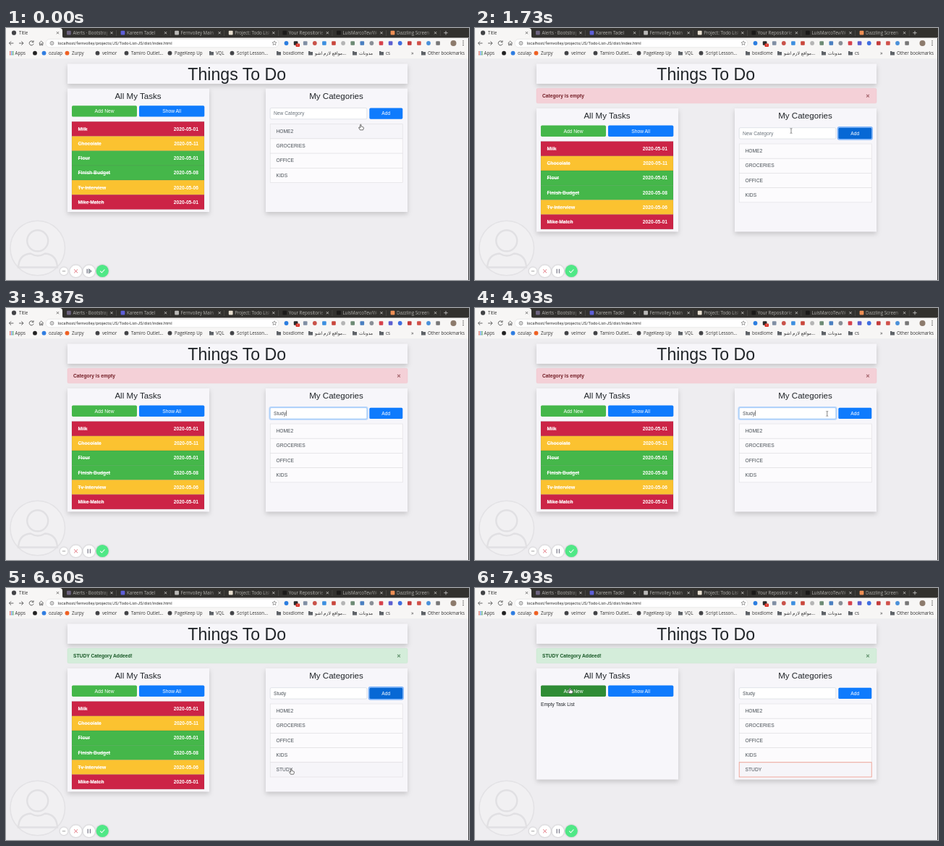
Animation of 640x348 px, one loop 8 s. Source, as an HTML page:

```html
<!DOCTYPE html>
<html lang="en">
<head>
<meta charset="utf-8">
<title>Things To Do</title>
<style>
html, body { margin: 0; width: 100%; height: 100%; overflow: hidden; background: #eeedf0; }
svg { display: block; width: 100vw; height: 100vh; font-family: "Liberation Sans", Arial, sans-serif; }
.ui { font-family: "Open Sans", "Noto Sans", sans-serif; }
.card { filter: drop-shadow(0 3px 3.4px rgba(0,0,0,.17)); }
.soft { filter: drop-shadow(0 .8px 1.2px rgba(0,0,0,.25)); }
</style>
</head>
<body>
<svg viewBox="0 0 640 348">
  <defs>
    <linearGradient id="fade">
      <stop offset="0" stop-color="#32312e" stop-opacity="0"/>
      <stop offset="1" stop-color="#32312e"/>
    </linearGradient>
  </defs>
  <g id="chrome" class="ui"></g>
  <g id="page"></g>
  <g id="recorder"></g>
  <g id="mouse"></g>
</svg>
<script>
const $ = id => document.getElementById(id);
const rect = (x, y, w, h, fill, more = '') =>
  `<rect x="${x}" y="${y}" width="${w}" height="${h}" fill="${fill}" ${more}/>`;
const dot = (x, y, r, fill, more = '') => `<circle cx="${x}" cy="${y}" r="${r}" fill="${fill}" ${more}/>`;
const line = (d, color, w = 1) => `<path d="${d}" fill="none" stroke="${color}" stroke-width="${w}"/>`;
const text = (x, y, size, str, fill, more = '') =>
  `<text x="${x}" y="${y}" font-size="${size}" fill="${fill}" ${more}>${str}</text>`;
const cross = (x, y, r, color, w) =>
  line(`M${x - r} ${y - r}l${2 * r} ${2 * r}m0 ${-2 * r}l${-2 * r} ${2 * r}`, color, w);
const MID = 'text-anchor="middle"', END = 'text-anchor="end"', BOLD = 'font-weight="bold"';
const BLUE = '#0f7bfd', BLUE_DARK = '#0768d5', GREEN = '#45b74a', GREEN_DARK = '#2f8c35';
const RED = '#cc2446', YELLOW = '#fbc230', GLOBE = '#434447';

// Browser window
const tabs = [
  ['Alerts · Bootstrap', '#6d6480'], ['Kareem Tadel', '#5d5fd8'], ['Fernvolley Main', '#b9b8b6'],
  ['Project: Todo List', '#e8dfd0'], ['Your Repositories', '#1b1a19'], ['LuisMarcoTev/We', '#1b1a19'],
  ['Dazzling Screen', '#ee8f55']
];
const bookmarks = [
  [46.5, '', '#222'], [59, 'ozulap', '#2f7de1'], [91, 'Zurpy', '#ee6123'], [133, 'velmor', GLOBE],
  [173, 'Tamiro Outlet...', GLOBE], [233, 'PageKeep Up', GLOBE], [290, 'VQL'],
  [319, 'Script Lesson...', GLOBE], [383, 'boxdlome'], [427, 'مواقع لازم اشو...'],
  [488, 'مدونات'], [525, 'cs'], [583, 'Other bookmarks']
];
const extensions = ['#2b7de0', '#2a2a2a', '#7f8ea3', '#c9534a', '#3c8fe0', '#c9473c', '#b5b5b5', '#6d8a74',
  '#4a7fc0', '#8a8f96', '#d6404a', '#5b5ecf', '#3f6fe0', '#c33b3b', '#d0504a', '#4a90d9', '#777'];

function drawChrome() {
  let s = rect(0, 0, 640, 14, '#32312e') + rect(0, 13.5, 640, 29, '#f7f6f5');
  s += '<path d="M0 14V0H74Q78 0 78 4V11Q78 14 81 14Z" fill="#f7f6f5"/>';
  s += dot(11, 6.7, 3.1, GLOBE) + text(18, 9, 6.2, 'Title', '#333') + cross(71.5, 6.7, 1.6, '#555', .8);
  tabs.forEach(([name, color], i) => {
    const x = 78 + i * 74.6;
    s += rect(x + 6, 3.8, 5.8, 5.8, color, 'rx="1"') + text(x + 14.4, 9, 6.2, name, '#b3b2af') +
      rect(x + 54, 1, 13, 12, 'url(#fade)') + rect(x + 62, 1, 12, 12, '#32312e') +
      cross(x + 68, 6.7, 1.6, '#d5d4d1', .8) + rect(x + 74.3, 3, .5, 8, '#5b5a57');
  });
  s += line('M608 4v5.4m-2.7-2.7h5.4', '#ccc', .8);
  // toolbar
  s += line('M10.4 21h-6m2.6-2.6L4.4 21l2.6 2.6', '#555', .9) +
    line('M18 21h6m-2.6-2.6l2.6 2.6l-2.6 2.6', '#555', .9) +
    line('M37.6 19.1a3 3 0 1 0 .5 2.6M38 17.3v2.3h-2.3', '#555', .9) +
    line('M45.6 21l3.1-2.9 3.1 2.9m-5.2-.6v3.4h1.4v-2h1.4v2h1.4v-3.4', '#555', .8);
  s += rect(55, 15.3, 322, 11.5, '#fff', 'rx="5.7" stroke="#ddd" stroke-width=".6"');
  s += dot(63.5, 21, 2.4, 'none', 'stroke="#555" stroke-width=".7"') + line('M63.5 20.6v1.7m0-2.9v.7', '#555', .7);
  s += text(71.6, 23.2, 5.75, 'localhost/fernvolley/projects/JS/Todo-List-JS/dist/index.html', '#333',
    'style="font-family:Roboto,sans-serif"');
  s += '<path d="M371 17.8l.9 2 2.1.2-1.6 1.4.5 2.1-1.9-1.1-1.9 1.1.5-2.1-1.6-1.4 2.1-.2z" fill="none" stroke="#666" stroke-width=".6"/>';
  extensions.forEach((c, i) => {
    const x = 387.5 + i * 13.1;
    s += i % 3 ? rect(x - 2.8, 18.2, 5.6, 5.6, c, 'rx="1"') : dot(x, 21, 2.9, c);
  });
  s += rect(400.5, 21.5, 5.5, 4.5, '#d93025', 'rx="1"') + text(403.2, 25.3, 4, '1', '#fff', MID);
  s += dot(618.5, 21, 4, '#8c7a6c') + [18, 20.8, 23.6].map(y => dot(632, y, .8, '#555')).join('');
  // bookmarks
  for (let i = 0; i < 9; i++)
    s += rect(5 + i % 3 * 2, 32 + (i / 3 | 0) * 2, 1.4, 1.4, ['#e35142', '#4a8af4', '#3ba55a'][i % 3]);
  s += text(12.5, 37, 6.2, 'Apps', '#333');
  for (const [x, name, color] of bookmarks) {
    s += color ? dot(x - 6.5, 34.7, 2.9, color)
      : `<path d="M${x - 9} 32h2l.8 1h3.2v4.4h-6z" fill="#5f6368"/>`;
    s += text(x, 37, 6.2, name, '#333');
  }
  s += text(560, 37, 7, '»', '#444');
  $('chrome').innerHTML = s;
}

// Page
const tasks = [
  ['Milk', '01', RED], ['Chocolate', '11', YELLOW], ['Flour', '01', GREEN],
  ['Finish Budget', '08', GREEN], ['Tv Interview', '06', YELLOW], ['Mike Match', '01', RED]
];
const ROW = 20.2;
const TYPED = [2600, 3070, 3470, 3670, 3870];
const ALERT = 400, FOCUS = 2070, ADDED = 5250, PICKED = 6680;

const panel = (x, y, w, h) => rect(x, y, w, h, '#f7f6fa', 'class="card"');
const button = (x, y, w, label, fill, ring) =>
  (ring ? rect(x - .8, y - .8, w + 1.6, 17, 'none', 'rx="2.2" stroke="#7fb5fb" stroke-width="1.6"') : '') +
  rect(x, y, w, 15.4, fill, 'rx="1.7"') + text(x + w / 2, y + 10, 6.7, label, '#fff', MID);

function alertBox(added) {
  const [bg, edge, ink, msg] = added
    ? ['#d4edda', '#c3e6cb', '#155724', 'STUDY Category Addeed!']
    : ['#f4d0d7', '#f1c3cb', '#721c24', 'Category is empty'];
  return rect(85, 83.4, 470, 20.4, bg, `rx="1.7" stroke="${edge}" stroke-width=".5"`) +
    text(93, 96, 6.7, msg, ink, BOLD) + cross(543, 93.8, 1.9, ink + '99', 1.1);
}

function drawPage(t, m) {
  const dy = t < ALERT ? 0 : 27.3, added = t >= ADDED, picked = t >= PICKED;
  const h = picked ? 153.5 : 170.3, top = 83.7 + dy;
  let s = rect(0, 42.5, 640, 306, '#eeedf0') + rect(639, 14, 1, 334, '#3a3a3c');
  s += panel(85, 49.5, 470, 27.5) + text(319.2, 71.6, 23.1, 'Things To Do', '#212529', MID);
  if (dy) s += alertBox(added);

  // tasks
  s += panel(85, top, 196, h) + text(182.5, 97.8 + dy, 11.6, 'All My Tasks', '#212529', MID);
  const overNew = m.x > 91 && m.x < 181 && m.y > 134 && m.y < 152;
  s += button(91, 107.2 + dy, 90, 'Add New', overNew ? GREEN_DARK : GREEN) +
    button(184, 107.2 + dy, 90.3, 'Show All', BLUE);
  if (picked) s += text(91, 136 + dy, 6.7, 'Empty Task List', '#212529');
  else tasks.forEach(([name, day, color], i) => {
    const y = 129.3 + dy + i * ROW;
    s += rect(91, y, 183, ROW, color, 'stroke="#000" stroke-opacity=".16" stroke-width=".5"') +
      text(99.5, y + 12.4, 6.7, name, '#fff', BOLD + ' text-decoration="line-through"') +
      text(266, y + 12.4, 6.7, '2020-05-' + day, '#fff', `${BOLD} ${END}`);
  });

  // categories
  s += panel(359, top, 196, h) + text(456.5, 97.8 + dy, 11.6, 'My Categories', '#212529', MID);
  const focus = t >= FOCUS && t < ADDED;
  if (focus) s += rect(364.4, 109.7 + dy, 135.2, 16.8, 'none', 'rx="2" stroke="#bcd8fb" stroke-width="2"');
  s += rect(365.2, 110.4 + dy, 133.6, 15.4, '#fff',
    `rx="1.7" stroke="${focus ? '#80b7f5' : '#ced4da'}" stroke-width=".6"`);
  const n = TYPED.filter(k => t >= k).length;
  s += n ? text(370, 120.4 + dy, 6.7, 'Study'.slice(0, n), '#495057')
    : text(370, 120.4 + dy, 6.7, 'New Category', '#6c757d');
  const since = t - (n ? TYPED[n - 1] : FOCUS);
  if (focus && since % 1000 < 530)
    s += rect([370, 374.6, 376.5, 380.2, 383.9, 387.3][n], 114.2 + dy, .6, 7.6, '#333');
  const overAdd = m.x > 501 && m.x < 549 && (t < 930 ? m.y < 126 : t > 4000 && m.y < 154);
  const ring = (t >= 800 && t < FOCUS) || (added && !picked);
  s += button(502.3, 110.4 + dy, 46, 'Add', overAdd || ring ? BLUE_DARK : BLUE, ring);

  const list = ['HOME2', 'GROCERIES', 'OFFICE', 'KIDS'].concat(added ? 'STUDY' : []);
  list.forEach((name, i) => {
    const y = 132.7 + dy + i * ROW, active = picked && i === 4;
    const hover = m.show && m.x > 365 && m.x < 548 && m.y - 3 > y && m.y - 3 < y + ROW;
    s += rect(365.2, y, 183, ROW, hover || active ? '#f6f5f9' : '#fcfbfd',
      `stroke="${active ? '#ee9484' : '#dfdee2'}" stroke-width="${active ? .8 : .6}"`) +
      text(373.5, y + 12.2, 6.7, name, '#495057');
  });
  $('page').innerHTML = s;
}

function drawRecorder(paused) {
  let s = dot(43.7, 304, 37.8, '#f1f0f2', 'stroke="#e3e2e5" stroke-width="1.6"') +
    dot(43.7, 293.8, 14.5, 'none', 'stroke="#e1e0e3" stroke-width="2.4"') +
    line('M17 330.5Q18 312.5 34 311.5Q44 317.5 54 311.5Q70 312.5 71 330.5Z', '#e1e0e3', 2.4);
  s += dot(80, 335.8, 5.3, '#fff', 'class="soft"') + line('M77.8 335.8h4.4', '#888', .8);
  s += dot(96.6, 335.8, 8.3, '#fff', 'class="soft"') + cross(96.6, 335.8, 2.4, '#e0717c', 1);
  s += dot(114.8, 335.8, 8.3, '#fff', 'class="soft"');
  s += paused ? line('M112.2 332.8v6', '#778', 1.3) + '<path d="M114.4 332.6l4 3.2-4 3.2z" fill="#9aa" stroke="#778" stroke-width=".7"/>'
    : line('M113.2 332.8v6m3.2-6v6', '#778', 1.2);
  s += dot(133.2, 335.5, 8.6, '#4fe886', 'class="soft"') + line('M130.2 335.7l2.2 2.1 4-4.3', '#fff', 1.1);
  $('recorder').innerHTML = s;
}

// Pointer
const path = [[0, 491, 137], [70, 491, 137], [340, 533, 121], [930, 533, 121], [1700, 437, 142],
  [4670, 437, 142], [5150, 525, 149], [6000, 525, 149], [6600, 395, 253.4], [7330, 395, 253.4],
  [7900, 132, 142], [8000, 132, 142]];

function pointer(t) {
  const i = path.findIndex(p => p[0] > t), [t0, x0, y0] = path[i - 1], [t1, x1, y1] = path[i];
  const k = (t - t0) / (t1 - t0), e = k * k * (3 - 2 * k);
  return { x: x0 + (x1 - x0) * e, y: y0 + (y1 - y0) * e, show: t < 2600 || t >= 4670 };
}

function drawMouse(t, { x, y, show }) {
  const inside = (a, b, c, d) => x > a && x < b && y > c && y < d;
  let s = '';
  if (t > 930 && inside(365, 499, 137, 154)) s = line('M-1.4-3.4Q0-3.4 0-2.6V2.6Q0 3.4-1.4 3.4M1.4-3.4Q0-3.4 0-2.6M0 2.6Q0 3.4 1.4 3.4', '#555', .7);
  else if (t <= 930 || inside(365, 549, 137, 265) || inside(91, 274, 134, 153))
    s = '<path d="M-1.6 3.8L-3.3 1Q-3.6 0-2.6 0L-1.4 1V-3.4Q-.7-4.4 0-3.4V-.8Q.8-1.4 1.3-.5Q2-1 2.4-.2Q3.2-.4 3.3.5V2L2.5 3.8Z" fill="#fff" stroke="#333" stroke-width=".7" stroke-linejoin="round"/>';
  else s = '<path d="M-2-4V3.2L-.4 1.8.7 4.2 1.9 3.7.9 1.4H3Z" fill="#222" stroke="#fff" stroke-width=".6"/>';
  $('mouse').innerHTML = show ? `<g transform="translate(${x} ${y})">${s}</g>` : '';
}

function frame(now) {
  const t = now % 8000, m = pointer(t);
  drawPage(t, m);
  drawRecorder(t < 200);
  drawMouse(t, m);
  requestAnimationFrame(frame);
}
drawChrome();
requestAnimationFrame(frame);
</script>
</body>
</html>
```
